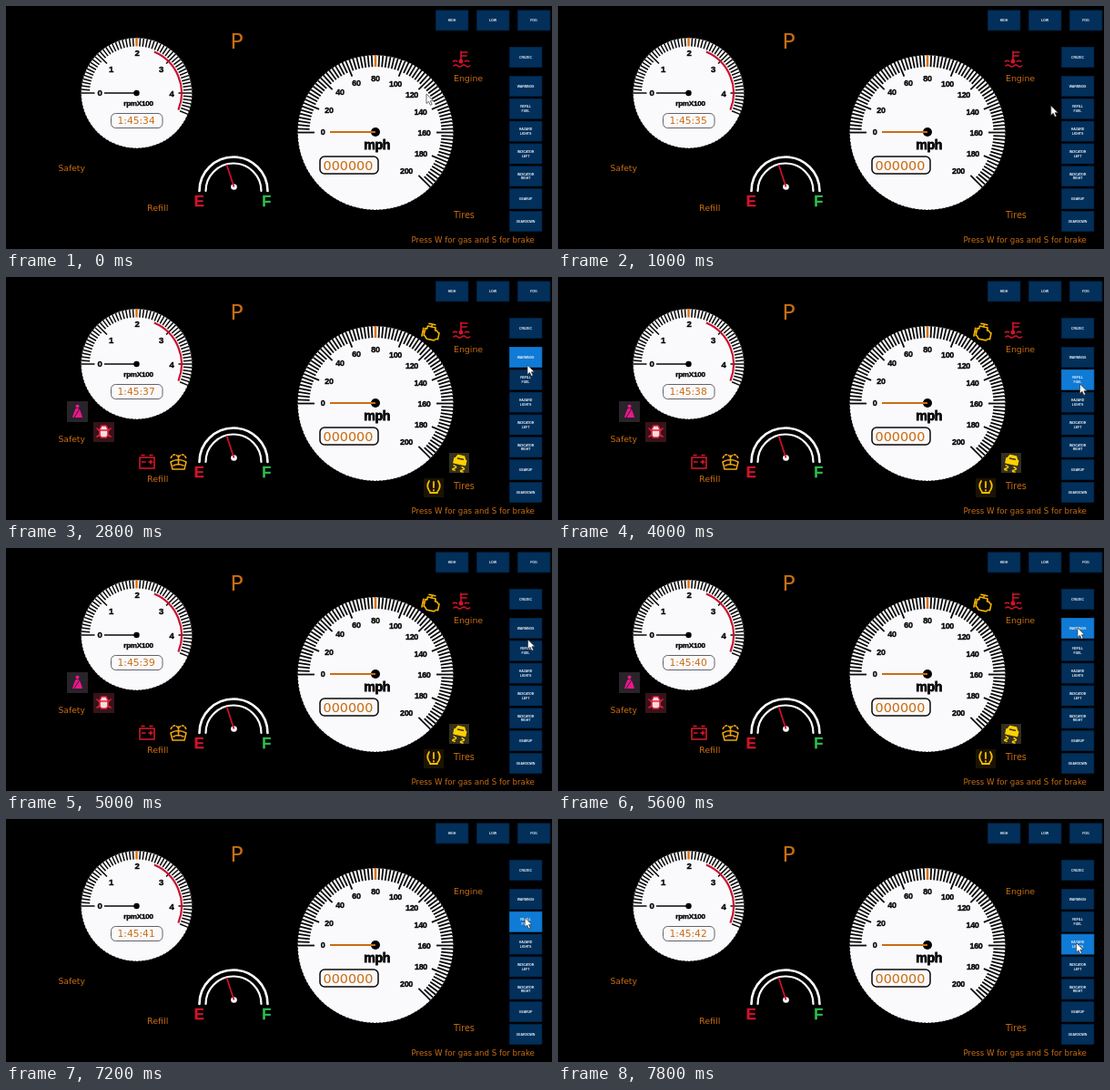
These frames come from a looping animation (600x268 px, 8000 ms). An HTML page:

```html
<!DOCTYPE html>
<html lang="en">
<head>
<meta charset="utf-8">
<title>Dashboard</title>
<style>
  html, body { margin: 0; width: 100%; height: 100%; overflow: hidden; background: #000; }
  svg { display: block; width: 100vw; height: 100vh; }
  .label { font-family: "DejaVu Sans", sans-serif; fill: #c96d12; }
  .bold { font-family: "Liberation Sans", Arial, sans-serif; font-weight: bold; text-anchor: middle; }
  .dark { fill: #080808; stroke: #080808; stroke-width: .4; letter-spacing: -.03em; }
  .button rect { fill: #02305b; stroke: #012448; stroke-width: .8; }
  .button.hover rect { fill: #107bd6; stroke: #0f70c4; }
  .button text { fill: #e4ecf4; font-size: 3.6px; letter-spacing: -.04em; }
  .line { fill: none; stroke-linecap: round; stroke-linejoin: round; }
</style>
</head>
<body>
<svg id="stage" viewBox="0 0 600 268">
  <rect width="600" height="268"/>
  <g id="dials"></g>

  <path d="M108 96H143" stroke="#080808" stroke-width="1.5"/>
  <circle cx="143.5" cy="96" r="3.2"/>
  <circle cx="406" cy="139" r="5"/>
  <path d="M356 139H406" stroke="#c96d12" stroke-width="1.8"/>
  <rect x="115.5" y="118.5" width="56.5" height="16" rx="5" fill="#faf9fb" stroke="#50545c" stroke-width=".9"/>
  <rect x="345" y="166" width="64" height="19" rx="5" fill="#faf9fb" stroke="#080808" stroke-width="1.5"/>

  <g class="line" stroke="#fff" stroke-width="2.6">
    <path d="M212.5 204A37.5 37.5 0 0 1 287.5 204"/>
    <path d="M219.5 204A30.5 30.5 0 0 1 280.5 204" stroke-width="2.2"/>
  </g>
  <circle cx="250.5" cy="199.5" r="3.3" fill="#fff"/>
  <path d="M250.5 199.5L242.5 175" stroke="#c8102e" stroke-width="1.8"/>

  <g id="temperature" class="line" stroke="#d0142c" stroke-width="1.6">
    <path d="M500 50V61M500 51H507M500 55H506M491.5 61q2-1.500 4 0M504.500 61q2-1.500 4 0M492 66q2.200-2 4.400 0t4.400 0 4.400 0 4.400 0"/>
    <circle cx="500" cy="61" r="1.7" fill="#d0142c"/>
  </g>

  <g id="warnings">
    <g class="line" stroke="#f4b400" stroke-width="1.6" transform="rotate(12 467 61)">
      <path d="M462 55H471V58H473L475 60H476V67H474L472 69H464L461 66H460V58H462ZM463 52H470M466.5 52V55M458 58V67M458 62H460"/>
    </g>

    <rect x="67" y="137" width="23" height="23" fill="#29232a"/>
    <g fill="#ed168c">
      <circle cx="78.500" cy="142.500" r="2"/>
      <path d="M76.500 145H80.500L82.500 150L84 155H73L74.500 150Z"/>
    </g>
    <path d="M81 145L75 155" stroke="#29232a"/>

    <rect x="96" y="160" width="23" height="22" fill="#38131a"/>
    <g class="line" stroke="#e3203b" stroke-width="1.600">
      <path d="M105 164H110L112 168V175L110 177H105L103 175V168Z" fill="#f4dede"/>
      <path d="M103 170L100 167M112 170L115 167M103 174L100 176M112 174L115 176M104 169H111"/>
    </g>

    <path class="line" stroke="#db1a2b" stroke-width="1.500" d="M147 199H163V211H147ZM149 196.500H152M158 196.500H161M149.500 204H153M157 204H161M159 202V206"/>

    <g class="line" stroke="#eea510" stroke-width="1.600">
      <path d="M181 204Q189 199 198 204L196 212H183ZM184 208Q189 205 195 208M189.500 207V197"/>
      <path d="M189 198Q184 193 181 200M190 198Q195 193 198 200" stroke-dasharray="2 2"/>
    </g>

    <rect x="487" y="194" width="22" height="22" fill="#35301f"/>
    <g class="line" stroke="#ffd000" stroke-width="1.500" transform="rotate(12 498 205)">
      <path d="M493 201L495 197H502L504 201H505V206H492V201Z" fill="#ffd000"/>
      <path d="M495.500 200.500H501.500" stroke="#35301f"/>
      <path d="M493 209q5 1 1 3t1 2M502 209q5 1 1 3t1 2"/>
    </g>

    <rect x="459" y="222" width="22" height="21" fill="#1b1404"/>
    <path class="line" stroke="#f7bd00" stroke-width="1.800" d="M466 237Q461 231 465 225M475 225Q479 231 474 237M466 238H474M470 226V232M470 235V235.500"/>
  </g>

  <g id="buttons"></g>
  <g id="texts"></g>
  <path id="cursor" d="M0 0V10.500L2.500 8.300L4.300 12.300L6.100 11.500L4.400 7.700H7.700Z" fill="#fff" stroke="#333" stroke-width=".7"/>
</svg>
<script>
const LOOP = 8000, STEP = 200;
const $ = id => document.getElementById(id);

function add(parent, tag, attrs, text) {
  const node = document.createElementNS(parent.namespaceURI, tag);
  for (const key in attrs) node.setAttribute(key, attrs[key]);
  if (text !== undefined) node.textContent = text;
  parent.append(node);
  return node;
}

const boldText = (parent, x, y, size, text, attrs = {}) =>
  add(parent, "text", { class: "bold dark", x, y, dy: ".36em", "font-size": size, ...attrs }, text);

const label = (x, y, size, text) =>
  add($("texts"), "text", { class: "label", x, y, "font-size": size }, text);

// Angles run clockwise in degrees from the left end of the scale.
function polar(cx, cy, r, angle) {
  const a = (angle + 180) * Math.PI / 180;
  return `${(cx + r * Math.cos(a)).toFixed(2)} ${(cy + r * Math.sin(a)).toFixed(2)}`;
}

function dial({ cx, cy, r, inner, major, sweep, step, every, width }) {
  const g = $("dials");
  add(g, "circle", { cx, cy, r, fill: "#faf9fb" });
  add(g, "circle", { cx, cy, r, fill: "none", stroke: "#000", "stroke-width": 1, "stroke-dasharray": "1.5 2.5" });
  for (let i = 0; i * step <= sweep; i++) {
    const angle = i * step, isTop = angle === 90, isMajor = i % every === 0 && !isTop;
    add(g, "path", {
      d: `M${polar(cx, cy, isMajor ? major : inner, angle)}L${polar(cx, cy, r, angle)}`,
      stroke: isTop ? "#d8720c" : "#080808",
      "stroke-width": isTop ? 2.4 : width
    });
  }
}

dial({ cx: 143.5, cy: 96, r: 61, inner: 51.5, major: 46, sweep: 202.5, step: 3.75, every: 12, width: 1.5 });
dial({ cx: 406, cy: 139.5, r: 85.5, inner: 72.5, major: 67, sweep: 225, step: 2.8125, every: 8, width: 1.8 });
add($("dials"), "path", {
  d: `M${polar(143.5, 96, 49.5, 113)}A49.5 49.5 0 0 1 ${polar(143.5, 96, 49.5, 202)}`,
  fill: "none", stroke: "#c8102e", "stroke-width": 2.2
});

[[103, 96], [115.5, 70], [144, 51.5], [170.5, 69.5], [182, 97]]
  .forEach(([x, y], i) => boldText($("dials"), x, y, 9.6, i));
[[348, 139], [355, 115], [367, 94.5], [385, 84.5], [406, 79.5], [428, 85.5],
 [446, 97.5], [455.5, 116.5], [459.5, 139.5], [456, 162.5], [440, 182]]
  .forEach(([x, y], i) => boldText($("dials"), x, y, 9, i * 20));
boldText($("dials"), 145.5, 107.5, 8.1, "rpmX100");
boldText($("dials"), 407.7, 153, 14.2, "mph", { style: "stroke-width:.8" });
boldText($("texts"), 212, 214.7, 16.5, "E", { style: "fill:#d0142c;stroke:#d0142c" });
boldText($("texts"), 286, 214.7, 16.5, "F", { style: "fill:#2fbd4c;stroke:#2fbd4c" });

const clock = label(122.5, 130.3, 10.7, "");
label(348.5, 181, 14.4, "000000");
label(246.5, 47, 23.5, "P");
label(57.5, 181.5, 9.2, "Safety");
label(155, 225.5, 9.5, "Refill");
label(492, 83, 9.4, "Engine");
label(492, 234, 9.6, "Tires");
label(445.5, 261, 8.65, "Press W for gas and S for brake");

function button(x, y, text) {
  const g = add($("buttons"), "g", { class: "button" });
  add(g, "rect", { x: x + .4, y: y + .4, width: 35.5, height: 22 });
  const lines = text.split(" ");
  lines.forEach((line, i) =>
    add(g, "text", { class: "bold", x: x + 18, y: y + 11.5 + (i - (lines.length - 1) / 2) * 4.6, dy: ".36em" }, line));
  return g;
}

["HIGH", "LOW", "FOG"].forEach((text, i) => button(472 + i * 45, 4.5, text));
button(553, 45, "CRUZEC");
const side = ["WARNINGS", "REFILL FUEL", "HAZARD LIGHTS", "INDICATOR LEFT", "INDICATOR RIGHT", "GEARUP", "GEARDOWN"]
  .map((text, i) => button(553, 77 + i * 24.85, text));

// Pointer path: time, x, y
const path = [
  [0, 462, 97], [400, 470, 99], [1200, 555, 112], [1600, 568, 112], [2000, 566.5, 98],
  [2400, 572, 93], [2800, 573, 97], [3400, 573, 106], [4000, 573.5, 118], [4500, 573.5, 113],
  [5000, 573.5, 101], [5600, 571, 88], [6400, 570.5, 83.5], [6900, 570.5, 88],
  [7400, 570, 120], [7800, 569.5, 136.5]
];
// Highlighted side button: start time, index
const hovers = [[0, -1], [1400, 1], [2200, 0], [3200, 1], [4800, -1], [5200, 0], [7200, 1], [7600, 2]];

function pointer(t) {
  const next = path.findIndex(p => p[0] > t);
  if (next < 0) return path.at(-1).slice(1);
  const [t0, x0, y0] = path[next - 1], [t1, x1, y1] = path[next];
  const k = (t - t0) / (t1 - t0), e = k * k * (3 - 2 * k);
  return [x0 + (x1 - x0) * e, y0 + (y1 - y0) * e];
}

const show = (node, on) => node.style.display = on ? "" : "none";

function draw(now) {
  const t = Math.floor(now % LOOP / STEP) * STEP;
  clock.textContent = `1:45:${34 + Math.floor((t + 400) / 1000)}`;
  show($("warnings"), t >= 2400 && t < 6800);
  show($("temperature"), t < 6800);
  const active = hovers.findLast(h => h[0] <= t)[1];
  side.forEach((node, i) => node.classList.toggle("hover", i === active));
  $("cursor").setAttribute("transform", `translate(${pointer(t)})`);
}

const start = performance.now();
function tick() {
  draw(performance.now() - start);
  requestAnimationFrame(tick);
}
tick();
</script>
</body>
</html>
```
